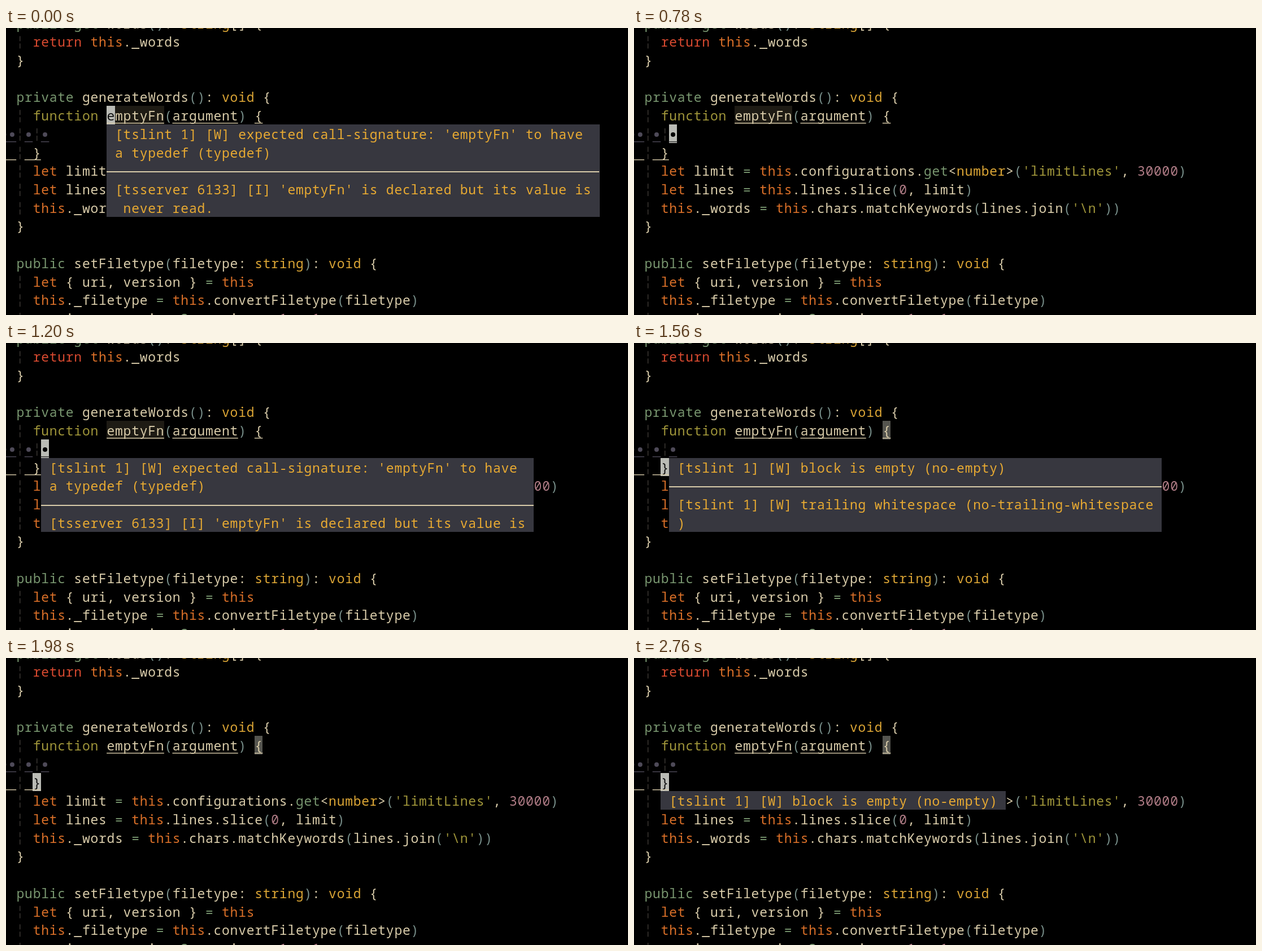
An HTML page with a canvas that plays this animation: 1101 by 509 pixels, repeating every 3.24 s.

```html
<!DOCTYPE html>
<html lang="en">
<head>
<meta charset="utf-8">
<title>Editor diagnostics</title>
<style>
html, body { margin: 0; width: 100%; height: 100%; overflow: hidden; background: #000; }
canvas { display: block; }
</style>
</head>
<body>
<canvas id="stage" width="1101" height="509"></canvas>
<script>
const ctx = document.getElementById('stage').getContext('2d');
const LOOP = 3240;
const CELL = 14.54, ROW = 32.71, LEFT = 18.2, TOP = 7.4, BASE = 25.9;
const FONT = '300 23px "Noto Sans Mono", "DejaVu Sans Mono", monospace';

const C = {
  text: '#d9ccaa', red: '#d94a30', orange: '#d96f28', green: '#78966f',
  olive: '#a0963a', yellow: '#dba535', blue: '#788f8a', pink: '#b07c86',
  guide: '#3a3632', dot: '#4e4a58', popup: '#37373f', message: '#e8aa32',
  cursor: '#babbb5', match: '#55554f', symbol: '#1e1b14'
};

// Each line is a list of colour, text pairs, starting at column 0.
const CODE = {
  '-1': ['green', 'public ', 'green', 'get ', 'text', 'words', 'blue', '()', 'text', ': ', 'yellow', 'string', 'text', '[] {'],
  0: ['red', '  return ', 'orange', 'this', 'text', '._words'],
  1: ['text', '}'],
  3: ['green', 'private ', 'text', 'generateWords', 'blue', '()', 'text', ': ', 'yellow', 'void ', 'text', '{'],
  4: ['olive', '  function ', 'text', 'emptyFn', 'blue', '(', 'text', 'argument', 'blue', ') ', 'text', '{'],
  6: ['text', '  }'],
  7: ['orange', '  let ', 'text', 'limit ', 'green', '= ', 'orange', 'this', 'text', '.configurations.', 'green', 'get',
    'text', '<', 'yellow', 'number', 'text', '>', 'blue', '(', 'olive', "'limitLines'", 'text', ', ', 'pink', '30000', 'blue', ')'],
  8: ['orange', '  let ', 'text', 'lines ', 'green', '= ', 'orange', 'this', 'text', '.lines.slice', 'blue', '(',
    'pink', '0', 'text', ', limit', 'blue', ')'],
  9: ['orange', '  this', 'text', '._words ', 'green', '= ', 'orange', 'this', 'text', '.chars.matchKeywords', 'blue', '(',
    'text', 'lines.join', 'blue', '(', 'olive', "'\\n'", 'blue', '))'],
  10: ['text', '}'],
  12: ['green', 'public ', 'text', 'setFiletype', 'blue', '(', 'text', 'filetype: ', 'yellow', 'string', 'blue', ')',
    'text', ': ', 'yellow', 'void ', 'text', '{'],
  13: ['orange', '  let ', 'text', '{ uri, version } ', 'green', '= ', 'orange', 'this'],
  14: ['orange', '  this', 'text', '._filetype ', 'green', '= ', 'orange', 'this', 'text', '.convertFiletype', 'blue', '(',
    'text', 'filetype', 'blue', ')'],
  15: ['text', '  version ', 'green', '= ', 'text', 'version ', 'green', '? ', 'text', 'version ', 'green', '+ ',
    'pink', '1 ', 'text', ': ', 'pink', '1']
};

const RULE = null;
const EMPTY_BLOCK = ' [tslint 1] [W] block is empty (no-empty)';
const TYPEDEF = [
  " [tslint 1] [W] expected call-signature: 'emptyFn' to have",
  ' a typedef (typedef)',
  RULE,
  " [tsserver 6133] [I] 'emptyFn' is declared but its value is",
  '  never read.'
];
const SPACES = [
  EMPTY_BLOCK,
  RULE,
  ' [tslint 1] [W] trailing whitespace (no-trailing-whitespace',
  ' )'
];

const ON_NAME = { row: 4, col: 11, char: 'e' };
const ON_SPACE = { row: 5, col: 3, char: '' };
const ON_BRACE = { row: 6, col: 2, char: '}' };
const popup = (row, col, width, lines) => ({ row, col, width, lines });

const STATES = [
  { at: 0, cursor: ON_NAME, popup: popup(5, 11, 60, TYPEDEF) },
  { at: 780, cursor: ON_SPACE },
  { at: 1200, cursor: ON_SPACE, popup: popup(6, 3, 60, TYPEDEF.slice(0, 4)) },
  { at: 1260, cursor: ON_SPACE, popup: popup(6, 3, 60, SPACES) },
  { at: 1560, cursor: ON_BRACE, popup: popup(6, 3, 60, SPACES) },
  { at: 1980, cursor: ON_BRACE },
  { at: 2280, cursor: ON_BRACE, popup: popup(7, 2, 42, [EMPTY_BLOCK]) }
];

const xOf = col => LEFT + col * CELL;
const yOf = row => TOP + row * ROW;

// Space the letters so that each one fills an editor cell.
ctx.font = FONT;
const gap = CELL - ctx.measureText('0'.repeat(100)).width / 100;
ctx.letterSpacing = `${gap}px`;

function block(row, col, width, height, color) {
  const x = Math.round(xOf(col)), y = Math.round(yOf(row));
  ctx.fillStyle = color;
  ctx.fillRect(x, y, Math.round(xOf(col + width)) - x, Math.round(yOf(row + height)) - y);
}

function write(row, col, text, color) {
  ctx.fillStyle = color;
  ctx.fillText(text, xOf(col) + gap / 2, yOf(row) + BASE);
}

function underline(row, col, width, color) {
  ctx.fillStyle = color;
  ctx.fillRect(xOf(col), Math.round(yOf(row) + 29.6), width * CELL, 1.4);
}

function guide(row, col) {
  const x = Math.round(xOf(col + 0.5)) - 1, y = yOf(row);
  ctx.fillStyle = C.guide;
  ctx.fillRect(x, y + 7, 1.5, 9);
  ctx.fillRect(x, y + 20, 1.5, 9);
}

function bullet(row, col, color) {
  ctx.fillStyle = color;
  ctx.beginPath();
  ctx.arc(xOf(col + 0.5), yOf(row) + 18, 4, 0, Math.PI * 2);
  ctx.fill();
}

function drawCode() {
  for (const [key, parts] of Object.entries(CODE)) {
    let col = 0;
    for (let i = 0; i < parts.length; i += 2) {
      write(+key, col, parts[i + 1], C[parts[i]]);
      col += parts[i + 1].length;
    }
  }
  for (const row of [0, 4, 5, 6, 7, 8, 9, 13, 14, 15]) guide(row, 0);
  guide(5, 2);
  for (const col of [-2, -1, 1, 3]) {
    bullet(5, col, C.dot);
    underline(5, col, 1, C.dot);
  }
  underline(4, 11, 7, C.text);
  underline(4, 19, 8, C.text);
  underline(4, 29, 1, C.text);
  underline(6, -2, 2, C.text);
  underline(6, 1, 2, C.text);
}

function drawCursor({ row, col, char }) {
  block(row, col, 1, 1, C.cursor);
  if (char) write(row, col, char, '#111');
  else bullet(row, col, '#000');
  underline(row, col, 1, char ? C.text : '#333');
}

function drawPopup({ row, col, width, lines }) {
  block(row, col, width, lines.length, C.popup);
  lines.forEach((line, i) => {
    if (line !== RULE) return write(row + i, col, line, C.message);
    ctx.fillStyle = C.text;
    ctx.fillRect(Math.round(xOf(col)), Math.round(yOf(row + i) + 17.6), Math.round(width * CELL), 2);
  });
}

function draw(time) {
  const state = STATES.findLast(s => s.at <= time);
  ctx.fillStyle = '#000';
  ctx.fillRect(0, 0, 1101, 509);
  if (state.cursor === ON_BRACE) block(4, 29, 1, 1, C.match);
  else block(4, 11, 7, 1, C.symbol);
  drawCode();
  drawCursor(state.cursor);
  if (state.popup) drawPopup(state.popup);
}

const start = performance.now();
function tick() {
  draw((performance.now() - start) % LOOP);
  requestAnimationFrame(tick);
}
tick();
</script>
</body>
</html>
```
